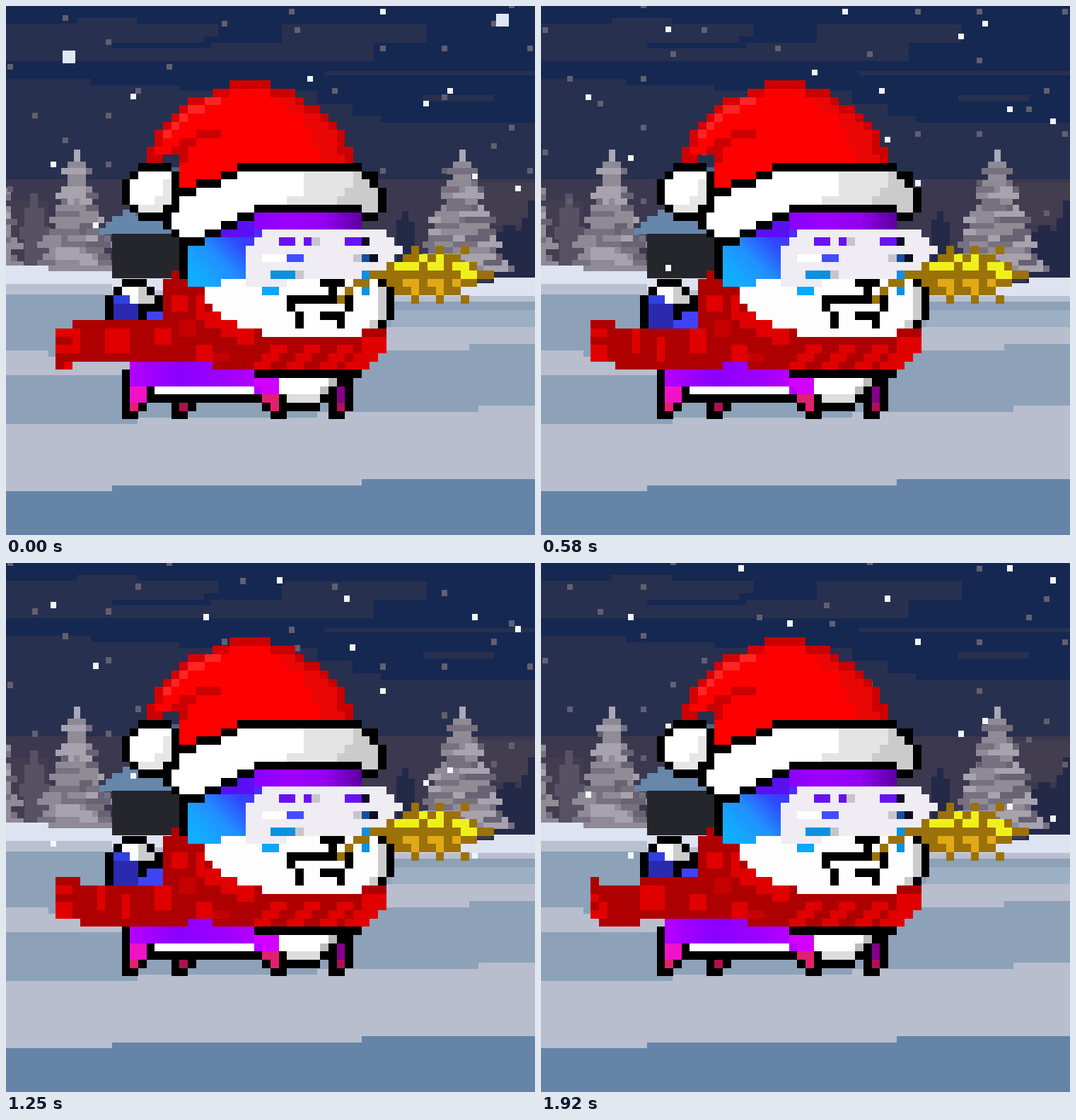
An HTML page that plays this animation: 748 by 748 pixels, repeating every 2000 ms.

```html
<!DOCTYPE html>
<html>
<head>
<meta charset="utf-8">
<style>
html, body { margin: 0; width: 100%; height: 100%; overflow: hidden; background: #28304f; }
svg { display: block; width: 100vw; height: 100vh; }
</style>
</head>
<body>
<svg id="stage" viewBox="0 0 748 748" shape-rendering="crispEdges"></svg>
<script>
const stage = document.getElementById('stage');
const CELL = 748 / 64;   // character pixel
const DOT = 8.65;        // scenery pixel

function add(parent, tag, attrs) {
  const node = document.createElementNS('http://www.w3.org/2000/svg', tag);
  for (const key in attrs) node.setAttribute(key, attrs[key]);
  parent.appendChild(node);
  return node;
}
const group = (parent, scale = 1) => add(parent, 'g', { transform: `scale(${scale})` });
const paint = (g, fill, d) => add(g, 'path', { fill, d });
const box = (x, y, w, h) => `M${x} ${y}h${w}v${h}h${-w}z`;
function gradient(id, [x1, y1, x2, y2], ...colors) {
  const g = add(stage, 'linearGradient', { id, x1, y1, x2, y2 });
  colors.forEach((c, i) => add(g, 'stop', { offset: i / (colors.length - 1), 'stop-color': c }));
}
let seed = 7;
const random = () => (seed = (seed * 16807) % 2147483647) / 2147483647;

gradient('fur', [0, 1, 0.9, 0], '#08b4ff', '#12acff', '#2090ff', '#3048ff', '#5a20ff');
gradient('crown', [0, 0, 1, 0], '#8a00ff', '#9c00ff', '#9400f0', '#5c00a0');
gradient('back', [0, 0, 1, 0], '#b400ff', '#8a00ff', '#a000ff', '#c800ff');

// --- scenery ---
const scene = group(stage);
paint(scene, '#28304f', box(0, 0, 748, 250));
paint(scene, '#152852', 'M0 0H748V165H530V156H490V138H440V120H245V112H120V103H0Z');
paint(scene, '#28304f', 'M0 25H100V17H185V25H300V43H280V52H150V60H0Z');
paint(scene, '#28304f', box(390, 26, 205, 26) + box(0, 60, 290, 18) + box(290, 52, 230, 26) + box(450, 92, 298, 6) + box(590, 126, 100, 9));
paint(scene, '#3b384f', 'M0 245H748V390H0Z');
paint(scene, '#433d50', box(0, 275, 60, 95) + box(670, 250, 78, 60));
paint(scene, '#232947', 'M552 385V302H560V290H569V305H578V385ZM686 390V328H694V320H703V310H720V318H729V300H738V275H748V390Z');
paint(scene, '#575164', 'M26 372V330H19V312H26V285H34V265H45V285H54V312H62V372Z');

function tree(cx, top, rows, spread) {
  const tones = ['#8e8995', '#a7a3ae', '#918b96', '#77717f', '#686273'];
  for (let i = 0; i < rows; i++) {
    const y = top + i * DOT;
    const reach = Math.max(0, Math.round(i * spread + (i % 4) * 0.5 - 0.6));
    for (let j = -reach; j <= reach;) {
      const run = Math.min(1 + Math.floor(random() * 4), reach - j + 1);
      const shade = Math.floor(random() * 4) + (j > 0 ? 1 : 0);
      paint(scene, i < 2 ? '#a9a9b8' : tones[shade], box(cx + (j - 0.5) * DOT, y, run * DOT + 0.3, DOT + 0.3));
      j += run;
    }
  }
}
tree(-6, 240, 16, 0.16);
tree(100, 203, 20, 0.31);
tree(645, 203, 20, 0.36);

paint(scene, '#dee3f1', 'M0 367H60V375H152V384H550V392H690V384H748V420H0Z');
paint(scene, '#b9c0cf', 'M0 393H150V402H260V410H748V425H0Z');
paint(scene, '#8da1b8', 'M0 408H140V416H540V418H748V748H0Z');
paint(scene, '#9dafc3', box(545, 430, 203, 24));
paint(scene, '#b8becd', 'M0 487H60V496H175V522H0ZM536 454H748V478H655V487H536Z');
paint(scene, '#b8becd', 'M0 591H186V582H440V574H668V565H748V669H503V678H150V686H0Z');
paint(scene, '#6584a8', 'M0 686H150V678H503V669H748V748H0Z');

paint(scene, '#496589', box(208, 228, 40, 40));
paint(scene, '#6686aa', 'M165 288H250V323H132V314H141V305H150V297H165Z');
paint(scene, '#25262c', box(150, 322, 100, 63));

// --- snow ---
const farSnow = paint(scene, '#626070', '');
const nearSnow = paint(scene, '#f1f6fc', '');
const bigSnow = paint(scene, '#dfe7f5', '');
const farFlakes = [[404, 8], [84, 17], [309, 25], [690, 25], [412, 34], [145, 51], [533, 60], [620, 60], [741, 60],
  [6, 86], [231, 86], [335, 112], [187, 120], [465, 120], [620, 129], [41, 155], [145, 155], [715, 172]];
const nearFlakes = [[533, 8], [430, 103], [628, 120], [180, 128], [594, 138], [387, 189], [482, 215], [67, 224],
  [663, 241], [283, 241], [724, 258], [490, 284], [127, 310], [352, 319]];
const bigFlakes = [[702, 20], [89, 72]];
const flake = (x, y, size) => box(x - size / 2, y - size / 2, size, size);

function drawSnow(step) {
  let far = '', near = '', big = '';
  for (const [x, y] of farFlakes)
    for (let yy = y + step * 2 * DOT - 40 * DOT; yy < 300; yy += 20 * DOT) far += flake(x, yy, DOT);
  for (const [x, y] of nearFlakes) {
    const low = y + step * 4 * DOT;
    if (low < 430) near += flake(x, low, DOT);
    near += flake(x, low - 39 * DOT, DOT);
  }
  for (const [x, y] of bigFlakes) {
    const fall = y + step * 16 * DOT;
    if (fall < 400) big += flake(x, fall, 2 * DOT);
  }
  farSnow.setAttribute('d', far);
  nearSnow.setAttribute('d', near);
  bigSnow.setAttribute('d', big);
}

// --- character, drawn on a 64 cell grid ---
const hero = group(stage, CELL);

const tails = [0, 1].map(wag => {
  const g = add(hero, 'g', {});
  const tip = add(g, 'g', { transform: `translate(${-wag} 0)` });
  paint(tip, '#000', `M14 33H17V34H18V35H19V${wag ? 38 : 39}H12V35H13V34H14Z`);
  paint(tip, '#fff', box(14, 34, 3, 1) + box(15, 35, 2, 1));
  paint(tip, '#ccc', box(16, 35, 2, 1) + box(16, 34, 1, 1));
  paint(tip, '#3140e0', box(13, 35, 2, 1));
  paint(tip, '#2b2aae', box(13, 36, 3, wag ? 1.7 : 3));
  paint(g, '#3f43f4', box(17, 37, 2, 1) + box(16, 38, 4, 1));
  return g;
});

// body and legs
paint(hero, '#000', 'M14 44H15V43H43V44H42V49H41V50H39V48H38V49H34V50H32V49H31V48H23V49H22V50H20V48H17V49H16V50H14Z');
paint(hero, 'url(#back)', 'M15 43H30V45H33V47H30V46H17V47H15Z');
paint(hero, '#d400ff', box(30, 45, 3, 1) + box(31, 46, 2, 1));
paint(hero, '#f012c8', box(15, 46, 2, 2));
paint(hero, '#e2206f', box(15, 48, 1, 1) + box(31, 47, 2, 1) + box(32, 48, 1, 1));
paint(hero, '#b01050', box(21, 48, 1, 1));
paint(hero, '#fff', box(18, 46, 12, 1) + box(33, 45, 6, 2) + box(34, 47, 4, 1));
paint(hero, '#ddd', box(34, 47, 4, 1) + box(38, 46, 1, 1));
paint(hero, '#bbb', box(39, 45, 1, 1) + box(38, 46, 1, 1));
paint(hero, '#86008c', box(40, 46, 1, 2));
paint(hero, '#b01058', box(40, 48, 1, 1));

// head
paint(hero, '#000', 'M21 28H24V27H45V33H46V34H47V38H46V40H24V33H21Z');
paint(hero, 'url(#fur)', 'M24 28H26V27H28V26H31V36H24V34H22V29H24Z');
paint(hero, 'url(#crown)', box(30, 25, 13, 2));
paint(hero, '#5a10f4', box(28, 26, 2, 1) + box(26, 27, 4, 1));
paint(hero, '#fdfdfd', 'M29 31H45V34H46V38H45V40H28V39H27V38H25V36H24V34H26V33H29Z');
paint(hero, '#ccc', box(45, 34, 1, 4) + box(44, 38, 1, 1));

// face cover
paint(hero, '#efecf3', 'M31 27H46V28H47V29H48V30H47V31H46V32H44V33H34V34H29V29H30V28H31Z');
paint(hero, '#6812f2', box(33, 28, 2, 1) + box(36, 28, 1, 1) + box(41, 28, 2, 1));
paint(hero, '#c7c4cb', box(37, 28, 1, 1) + box(35, 32, 1, 1) + box(42, 30, 1, 1));
paint(hero, '#fff', box(31, 30, 3, 1));
paint(hero, '#424cff', box(34, 30, 2, 1));
paint(hero, '#0c91e2', box(32, 32, 3, 1) + box(43, 32, 1, 1) + box(43, 34, 1, 1));
paint(hero, '#08a8ff', box(31, 34, 2, 1));
paint(hero, '#174e9c', box(43, 30, 1, 1));
paint(hero, '#100b20', box(43, 28, 1, 1) + box(44, 30, 1, 1));

// nose and mouth
paint(hero, '#000', box(38, 33, 3, 1) + box(39, 34, 1, 1) + box(34, 35, 6, 1) + box(34, 35, 1, 2)
  + box(35, 37, 1, 2) + box(41, 35, 1, 2) + box(38, 37, 3, 1) + box(40, 37, 1, 2));

// golden sprig
paint(hero, '#9b7209', 'M40 35H41V34H42V33H44V32H46V31H48V30H49V29H50V30H52V29H53V30H55V29H56V30H55V31H57V32H59V33H57V34H55V35H56V36H55V35H53V36H52V35H50V36H49V35H47V34H46V33H44V34H42V35H41V36H40Z');
paint(hero, '#eff01b', box(50, 30, 1, 1) + box(52, 30, 1, 1) + box(47, 31, 3, 1) + box(51, 31, 2, 1) + box(54, 31, 2, 1) + box(55, 32, 2, 1));
paint(hero, '#e2a916', box(48, 33, 2, 1) + box(51, 33, 2, 1) + box(54, 33, 1, 1) + box(49, 34, 1, 1) + box(52, 34, 1, 1));

// scarf end, three poses
const BRIGHT = '#e00000', DEEP = '#ae0000';
const scarfPoses = [
  ['M6 39H8V38H22V43H8V44H6Z', box(6, 39, 2, 1) + box(6, 41, 2, 1) + box(7, 43, 1, 1) + box(8, 39, 1, 3) + box(12, 39, 3, 3) + box(18, 39, 2, 2)],
  ['M6 38H7V39H12V38H22V43H12V44H7V43H6Z', box(6, 40, 1, 1) + box(7, 41, 1, 1) + box(6, 42, 2, 1) + box(12, 39, 3, 3) + box(18, 40, 2, 2)],
  ['M6 38H9V39H22V44H9V43H6Z', box(6, 39, 2, 1) + box(6, 41, 2, 2) + box(11, 39, 1, 3) + box(14, 40, 1, 3) + box(18, 39, 2, 3)]
].map(([shape, light], i) => {
  const g = add(hero, 'g', {});
  paint(g, DEEP, shape);
  paint(g, BRIGHT, light);
  if (i === 1) paint(g, '#8a00ff', box(22, 43, 1, 1));
  return g;
});

// scarf collar
paint(hero, DEEP, 'M20 32H21V33H22V34H24V36H25V37H26V38H28V39H31V40H43V39H46V42H45V43H44V44H25V43H22V42H20V39H19V33H20Z');
paint(hero, BRIGHT, box(20, 35, 2, 2) + 'M23 35H24V37H26V38H28V39H30V41H28V40H26V39H24V38H23Z'
  + 'M23 41H25V42H27V43H23ZM43 40H46V42H45V43H44V44H41V43H42V42H43Z');
for (const x of [31, 35, 39]) paint(hero, BRIGHT, `M${x + 1} 41h2v1h-1v1h-1v1h-2v-1h1v-1h1z`);
paint(hero, '#c50000', box(21, 38, 2, 2) + box(25, 42, 2, 1));
paint(hero, '#000', box(30, 44, 13, 1));

// hat
paint(hero, '#fe0000', 'M27 9H32V10H35V11H36V12H38V13H39V14H40V15H41V17H42V19H28V20H26V21H23V22H21V18H19V19H17V17H18V15H19V14H20V13H21V12H22V11H25V10H27Z');
paint(hero, '#eb0606', 'M33 11H36V12H38V13H39V14H40V15H41V19H38V17H37V15H36V13H34V12H33Z');
paint(hero, '#cb0000', box(27, 9, 5, 1) + 'M32 10H35V11H36V12H38V13H39V14H40V15H41V17H42V19H41V18H40V15H39V14H38V13H36V12H35V11H32Z');
paint(hero, '#cb0000', 'M23 15H26V16H23V17H22V19H21V18H19V19H17V17H18V18H20V17H21V16H23Z');
paint(hero, '#d60000', 'M25 10H27V11H25V12H22V13H21V14H20V15H19V17H18V15H19V14H20V13H21V12H22V11H25Z');
paint(hero, '#fd2525', box(24, 11, 2, 1) + box(22, 12, 2, 1) + box(21, 13, 1, 1) + box(20, 14, 1, 1) + box(19, 15, 1, 1));

// brim
paint(hero, '#000', 'M28 19H43V20H45V21H45V22H46V25H45V26H43V25H30V26H28V27H26V28H24V29H21V28H20V27H19V24H20V23H21V22H23V21H26V20H28Z');
paint(hero, '#fff', 'M28 20H43V21H44V22H45V24H43V24H30V25H28V26H26V27H24V28H21V27H20V24H21V23H23V22H26V21H28Z');
paint(hero, '#e4e4e4', 'M36 20H43V21H44V22H45V24H34V23H36Z');
paint(hero, '#cbcbcb', 'M42 20H43V21H44V22H45V25H43V24H40V23H41V22H42Z');

// bobble
paint(hero, '#000', 'M16 19H20V20H21V25H19V26H16V25H15V24H14V21H15V20H16Z');
paint(hero, '#fff', 'M16 20H20V24H19V25H16V24H15V21H16Z');
paint(hero, '#e6e6e6', 'M19 21H20V24H19V25H16V24H18V23H19Z');

// --- playback: 24 poses in two seconds ---
const scarfAt = [0, 0, 1, 1, 1, 2, 2, 2, 2, 0];
const show = (list, chosen) => list.forEach((g, i) => g.setAttribute('visibility', i === chosen ? 'visible' : 'hidden'));
let shown = -1;

function update(ms) {
  const tick = Math.floor((ms % 2000 + 4) / 2000 * 24) % 24;
  if (tick === shown) return;
  shown = tick;
  drawSnow(tick % 10);
  show(scarfPoses, scarfAt[tick % 10]);
  show(tails, tick % 8 === 3 ? 1 : 0);
}

const start = performance.now();
function loop() {
  update(performance.now() - start);
  requestAnimationFrame(loop);
}
loop();
</script>
</body>
</html>
```
